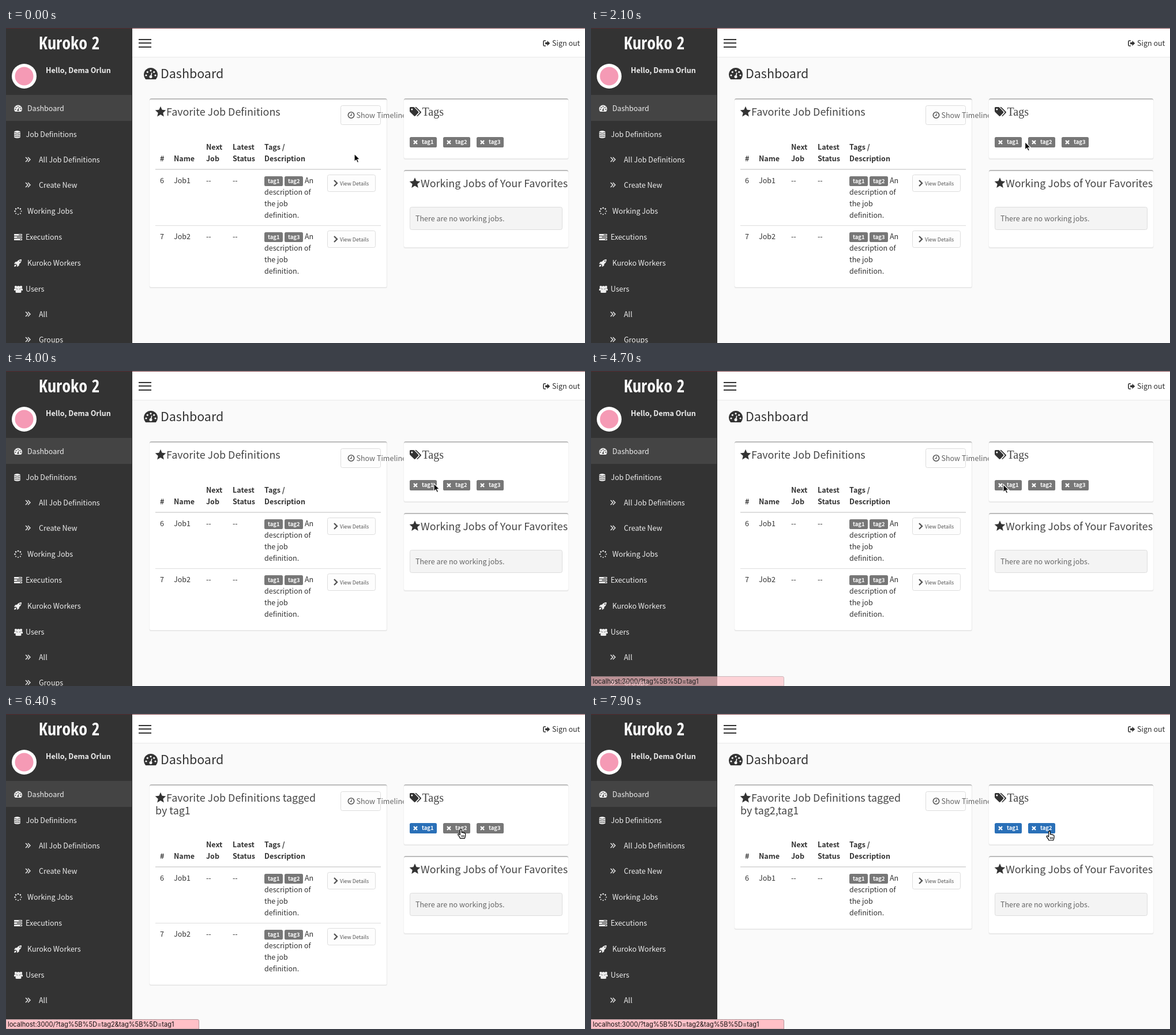
An HTML page that plays this animation: 1004x546 px, repeating every 8000 ms.

```html
<!DOCTYPE html>
<html lang="en">
<head>
<meta charset="utf-8">
<title>Job dashboard</title>
<style>
  html, body { margin: 0; width: 100%; height: 100%; overflow: hidden; background: #fafafa; }
  svg { display: block; }
  text { font-family: "Noto Sans CJK JP", "Noto Sans CJK", "Noto Sans", sans-serif; white-space: pre; }
  .logo { font: 300 30px "Open Sans Condensed", "Open Sans", "Roboto Condensed", sans-serif; font-stretch: condensed; }
  .serif { font-family: "Liberation Serif", serif; }
  .url { font: 11.1px Inter, "Liberation Sans", sans-serif; }
</style>
</head>
<body>
<svg width="1004" height="546" viewBox="0 0 1004 546">
  <g id="page"></g>
  <g id="status">
    <path d="M0 529.5H332Q334.5 529.5 334.5 532V546H0Z" fill="#ffc0c7" stroke="#b59a9d"/>
    <text id="url" class="url" x="3" y="542" fill="#111"></text>
  </g>
  <path id="arrow" d="M0 0V13.6L3.2 10.7L5.3 15.6L7.7 14.6L5.6 9.8H9.7Z" fill="#000" stroke="#fff" stroke-width="1.2"/>
  <g id="hand" stroke="#000" stroke-linejoin="round">
    <path d="M-1.4 1Q0 -.8 1.4 1V6Q2.7 5 3.7 6.3Q5 5.6 6 7Q7.7 6.6 8 8.4V11Q8 13.5 6.5 16.2H-1Q-2 13.5 -4.5 10.7Q-5.6 8.9 -4.4 8.4Q-3.2 8 -1.4 10Z" fill="#fff" stroke-width="1.2"/>
    <path d="M1.5 10.5v3.5M3.5 10.5v3.5M5.5 10.5v3.5" stroke-width=".9"/>
  </g>
</svg>
<script>
const LOOP = 8000, STEP = 100;
const DARK = '#333', LIGHT = '#eee', GREY = '#777', BLUE = '#2a70b8';
const $ = id => document.getElementById(id);

// Latin letters of the CJK face are drawn about 1.117 times larger.
const text = (x, y, str, size = 14, fill = DARK, weight = 400, extra = '') =>
  `<text x="${x}" y="${y}" font-size="${size / 1.117}" fill="${fill}" font-weight="${weight}" ${extra}>${str}</text>`;
const bold = (x, y, str, size = 14, fill = DARK) => text(x, y, str, size, fill, 600);
const rect = (x, y, w, h, fill, extra = '') =>
  `<rect x="${x}" y="${y}" width="${w}" height="${h}" fill="${fill}" ${extra}/>`;
const dot = (x, y, r, fill) => `<circle cx="${x}" cy="${y}" r="${r}" fill="${fill}"/>`;
const fillPath = (d, fill) => `<path d="${d}" fill="${fill}"/>`;
const line = (d, color, width) => `<path d="${d}" fill="none" stroke="${color}" stroke-width="${width}"/>`;
const at = (x, y, body, scale = 1) => `<g transform="translate(${x} ${y}) scale(${scale})">${body}</g>`;
const outlined = (x, y, w, h, fill, color = '#ddd') =>
  rect(x + .5, y + .5, w - 1, h - 1, fill, `rx="3" stroke="${color}"`);

const gauge = (x, y, scale, color, hole) => at(x, y,
  fillPath('M3.1 20A12 12 0 1 1 20.9 20Z', color) +
  [[4, 13], [6.3, 7.3], [12, 4.8], [17.7, 7.3], [20, 13]].map(p => dot(...p, 1.6, hole)).join('') +
  line('M12 16L13.8 8.5', hole, 1.6) + dot(12, 15.6, 2.5, hole), scale);

function star(cx, cy, r) {
  const points = Array.from({ length: 10 }, (_, i) => {
    const a = (i / 5 - .5) * Math.PI, d = i % 2 ? r * .46 : r;
    return `${cx + d * Math.cos(a)},${cy + d * Math.sin(a)}`;
  });
  return `<polygon points="${points.join(' ')}" fill="${DARK}"/>`;
}

const tagsIcon = (x, y) => at(x, y,
  fillPath('M0 1.5Q0 0 1.5 0H6.5Q7.5 .2 8.3 1L15 8Q16 9 15 10L9.7 15.6Q8.7 16.5 7.7 15.6L1 9Q0 8 0 7Z' +
    'M9 0H10.5Q11.6 .2 12.4 1L19.5 8Q20.5 9 19.5 10L14.2 15.6Q13 16.4 12.2 15.4L17 10.3Q18 9 17 8Z', DARK) +
  dot(3.9, 3.9, 1.5, '#fff'));

const doubleAngle = (x, y) => line(`M${x} ${y - 4}l4 4l-4 4m4 -8l4 4l-4 4`, LIGHT, 1.4);

const database = at(14, 178,
  fillPath('M0 2.2A5.5 2.2 0 0 1 11 2.2V10.8A5.5 2.2 0 0 1 0 10.8Z', LIGHT) +
  [3, 6, 9].map(y => line(`M0 ${y}Q5.5 ${y + 3} 11 ${y}`, DARK, .9)).join(''));

const spinner = Array.from({ length: 8 }, (_, i) => {
  const a = i * Math.PI / 4;
  return dot(21 + 5.5 * Math.cos(a), 317.5 + 5.5 * Math.sin(a), 1 + (i > 3) * .3, LIGHT);
}).join('');

const tasks = [0, 4, 8].map((dy, i) =>
  rect(14, 357 + dy, 14, 3, LIGHT, 'rx=".5"') + rect([22, 19, 24][i], 358 + dy, [5, 8, 3][i], 1, DARK)).join('');

const rocket = at(14, 401,
  fillPath('M13 0Q8 0 5 4L2 4.5L0 8L3 7.8L5.3 10.1L5 13L8.5 11L9 8Q13 5 13 0ZM2.5 9Q0 9.5 .2 12.8Q3.5 13 4 10.5Z', LIGHT) +
  dot(10.2, 2.9, 1, DARK));

const users = at(14, 446,
  dot(3, 3, 2.2, LIGHT) + dot(12, 3, 2.2, LIGHT) +
  fillPath('M0 9V7Q.3 5 2 5.2H5L4 9ZM15 9V7Q14.7 5 13 5.2H10L11 9Z', LIGHT) +
  dot(7.5, 4, 3, LIGHT) + fillPath('M2.5 11.5Q2.5 7 5 7H10Q12.5 7 12.5 11.5Q12.3 13 10.5 13H4.5Q2.7 13 2.5 11.5Z', LIGHT));

const signOut = at(931, 21,
  line('M5 1H2.5Q1 1 1 2.5V8.5Q1 10 2.5 10H5', DARK, 1.6) +
  fillPath('M4 3.8H7.5V1L12.3 5.5L7.5 10V7.2H4Z', DARK));

function sidebar() {
  const items = [
    [37, 144, 'Dashboard'], [34.5, 189, 'Job Definitions'], [57, 233, 'All Job Definitions'],
    [57, 277, 'Create New'], [37, 322, 'Working Jobs'], [34, 367, 'Executions'],
    [37, 412, 'Kuroko Workers'], [34, 457, 'Users'], [57, 501, 'All'], [57, 545, 'Groups']
  ];
  return rect(0, 0, 219, 546, DARK) + rect(0, 116, 218, 45, '#444') +
    '<text class="logo" x="109.5" y="37" fill="#fff" text-anchor="middle">Kuroko 2</text>' +
    dot(31.5, 83.5, 21.5, '#fff') + dot(31.5, 83.5, 16, '#f59ab5') +
    bold(69, 78, 'Hello, Dema Orlun', 14, LIGHT) +
    items.map(([x, y, label]) => text(x, y, label, 14, LIGHT) + (x === 57 ? doubleAngle(34, y - 5) : '')).join('') +
    gauge(14, 133.5, .58, LIGHT, '#444') + database + spinner + tasks + rocket + users;
}

const panel = (x, y, w, h) =>
  rect(x - .5, y + 1, w + 1, h + 1, '#e9e9e9', 'rx="3"') + rect(x, y, w, h, '#bbb', 'rx="3"') +
  rect(x, y + 2, w, h - 2, '#fff', 'rx="2"');

const smallTag = (x, y, label) =>
  rect(x, y, 32, 17, GREY, 'rx="2.6"') + bold(x + 6, y + 12, label, 10.5, '#fff');

const filterTag = (x, label, fill) =>
  rect(x, 189, 47, 18, fill, 'rx="2.6"') + line(`M${x + 7} 195l6 6m0 -6l-6 6`, '#fff', 2.3) +
  bold(x + 21, 201, label, 10.5, '#fff');

function jobRow(y, id, name, tag) {
  const words = ['description of', 'the job', 'definition.'];
  return text(267, y, id) + text(291, y, name) + text(347, y, '--') + text(393, y, '--') +
    smallTag(448, y - 12, 'tag1') + smallTag(483, y - 12, tag) + text(518, y, 'An') +
    words.map((w, i) => text(448, y + 20 * (i + 1), w)).join('') +
    outlined(557, y - 15, 84, 30, '#fdfdfd') +
    line(`M569 ${y - 5}l5 5l-5 5`, '#555', 2.4) + text(579, y + 4, 'View Details', 10, '#555');
}

function favorites(view) {
  const dy = view ? 20 : 0, title = 'Favorite Job Definitions';
  const heads = [[267, 231, '#'], [291, 231, 'Name'], [347, 211, 'Next'], [347, 231, 'Job'], [393, 211, 'Latest'],
    [393, 231, 'Status'], [448, 211, 'Tags /'], [448, 231, 'Description']];
  return panel(249, 122, 411.5, [327, 347, 250][view]) + star(268, 145.5, 9.8) +
    text(278, 152, view ? title + ' tagged' : title, 20, '#444') +
    (view ? text(259, 174, ['', 'by tag1', 'by tag2,tag1'][view], 20, '#444') : '') +
    outlined(580, 134, 70, 34, '#fdfdfd') +
    `<circle cx="598.5" cy="151" r="5.2" fill="none" stroke="#555" stroke-width="1.6"/>` +
    line('M599 148v3.7h-2.7', '#555', 1.2) + text(607.5, 156, 'Show Timeline', 14, '#666') +
    at(0, dy, heads.map(h => bold(...h)).join('') + rect(259, 244, 391, 2, '#ddd') +
      jobRow(269, 6, 'Job1', 'tag2') +
      (view < 2 ? rect(259, 342, 391, 1, '#ddd') + jobRow(366, 7, 'Job2', 'tag3') : ''));
}

function drawPage(view) {
  $('page').innerHTML =
    rect(0, 0, 1004, 546, '#fafafa') + rect(219, 0, 785, 50, '#fff') + rect(219, 50, 785, 1, '#e9e9e9') +
    [19, 25, 32].map(y => rect(230, y, 22, 2, DARK)).join('') + signOut + text(947, 31, 'Sign out') +
    gauge(239, 69, 1, DARK, '#fafafa') + text(268, 87, 'Dashboard', 24) +
    favorites(view) +
    panel(690, 122, 285, 104) + tagsIcon(700, 137) +
    '<text class="serif" x="721.5" y="152" font-size="20" fill="#444">Tags</text>' +
    filterTag(700, 'tag1', view ? BLUE : GREY) + filterTag(758, 'tag2', view > 1 ? BLUE : GREY) +
    (view < 2 ? filterTag(816, 'tag3', GREY) : '') +
    panel(690, 246, 285, 134) + star(709, 269, 9.8) +
    text(719, 276, 'Working Jobs of Your Favorites', 20, '#444') +
    outlined(700, 310, 265, 40, '#f4f4f4') + text(710, 335, 'There are no working jobs.', 14, '#666') +
    sidebar() + rect(219, 0, 785, 1, '#84474d') + rect(0, 0, 219, 1, '#552a30');
}

// time, x, y of the pointer's hot spot
const route = [
  [0, 604, 218], [700, 672, 211], [1000, 672, 211], [1400, 732, 203.5], [1800, 742, 200], [2500, 769, 193.5],
  [3000, 769, 193.5], [3700, 742, 195], [4000, 742, 195], [4700, 715, 196.5], [4900, 722, 197], [5400, 739.5, 198],
  [6000, 739.5, 198], [6400, 788.7, 199.5], [6900, 788.7, 199.5], [7700, 795, 202.8], [LOOP, 795, 202.8]
];

function pointer(t) {
  const i = route.findIndex(p => p[0] > t), [t0, x0, y0] = route[i - 1], [t1, x1, y1] = route[i];
  const u = (t - t0) / (t1 - t0), k = u * u * (3 - 2 * u);
  return `translate(${x0 + (x1 - x0) * k} ${y0 + (y1 - y0) * k})`;
}

let shownView = -1;
function draw(now) {
  const t = Math.floor(now % LOOP / STEP) * STEP;
  const view = t < 6000 ? 0 : t < 7200 ? 1 : 2;
  if (view !== shownView) drawPage(shownView = view);

  const onLink = t >= 4800;
  $('arrow').style.display = onLink ? 'none' : '';
  $('hand').style.display = onLink ? '' : 'none';
  $(onLink ? 'hand' : 'arrow').setAttribute('transform', pointer(t));

  $('status').setAttribute('opacity', Math.max(0, Math.min(1, (t - 4500) / 300)));
  $('url').textContent = 'localhost:3000/?tag%5B%5D=' + (t < 6200 ? 'tag1' : 'tag2&tag%5B%5D=tag1');
  requestAnimationFrame(draw);
}
requestAnimationFrame(draw);
</script>
</body>
</html>
```
